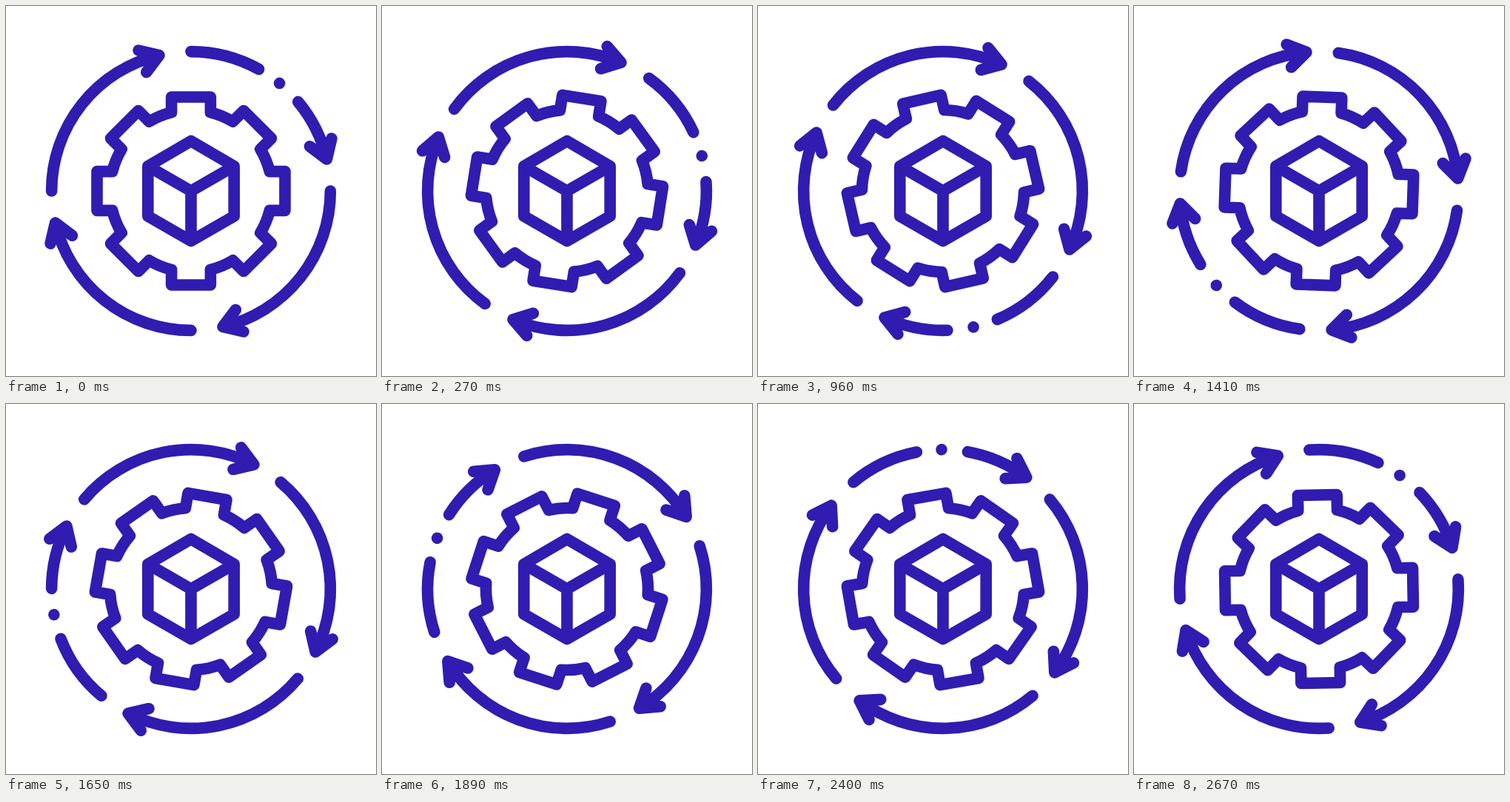
An HTML page for the animation above (2700 ms loop, 500 by 500 pixels).

```html
<!DOCTYPE html>
<html lang="en">
<head>
<meta charset="utf-8">
<title>Production cycle</title>
<style>
  html, body { margin: 0; width: 100%; height: 100%; overflow: hidden; background: #fff; }
  svg { display: block; width: 100%; height: 100%; }
</style>
</head>
<body>
<svg viewBox="-250 -250 500 500">
  <g fill="none" stroke="#301cb0" stroke-width="15.6" stroke-linecap="round" stroke-linejoin="round">
    <path id="ring"/>
    <path id="gear"/>
    <path d="M0-67.5 58.2-33.5V34L0 67.5-58.2 34V-33.5ZM-58.2-33.5 0 0 58.2-33.5M0 0V67.5"/>
  </g>
</svg>
<script>
const LOOP = 2700, STEP = 30;
const RING = 188.4, TIP = 76.8;
const TOOTH = { half: 26.4, top: 127, base: 106.3 };
const ring = document.getElementById('ring');
const gear = document.getElementById('gear');

// Rotate a point clockwise about the centre, in degrees.
function turn([x, y], deg) {
  const a = deg * Math.PI / 180, c = Math.cos(a), s = Math.sin(a);
  return [x * c - y * s, x * s + y * c].map(v => v.toFixed(2)).join(' ');
}

const onRing = deg => turn([RING, 0], deg);
const arc = (from, to) => `M${onRing(from)}A${RING} ${RING} 0 0 1 ${onRing(to)}`;

function ringPath() {
  let d = '';
  for (let q = 0; q < 360; q += 90) {
    const tip = q + TIP;
    d += q === 270
      ? arc(q, 299.1) + `M${onRing(309.4)}h.01` + arc(320.2, tip)
      : arc(q, tip);
    d += `M${turn([190, -71], q + 90)}L${onRing(tip)}L${turn([160.5, -60.3], q + 90)}`;
  }
  return d;
}

function gearPath() {
  const { half, top, base } = TOOTH, r = Math.hypot(half, base);
  let d = '';
  for (let a = 0; a < 360; a += 45) {
    const at = (x, y) => turn([x, -y], a);
    d += a ? `A${r} ${r} 0 0 1 ` : 'M';
    d += `${at(-half, base)}L${at(-half, top)}L${at(half, top)}L${at(half, base)}`;
  }
  return `${d}A${r} ${r} 0 0 1 ${turn([-half, -base], 0)}Z`;
}

function draw(ms) {
  const n = Math.floor((ms % LOOP + 0.5) / STEP);
  ring.setAttribute('transform', `rotate(${n * 4})`);
  gear.setAttribute('transform', `rotate(${n})`);
}

ring.setAttribute('d', ringPath());
gear.setAttribute('d', gearPath());
draw(0);

let start;
function tick(now) {
  start ??= now;
  draw(now - start);
  requestAnimationFrame(tick);
}
requestAnimationFrame(tick);
</script>
</body>
</html>
```
